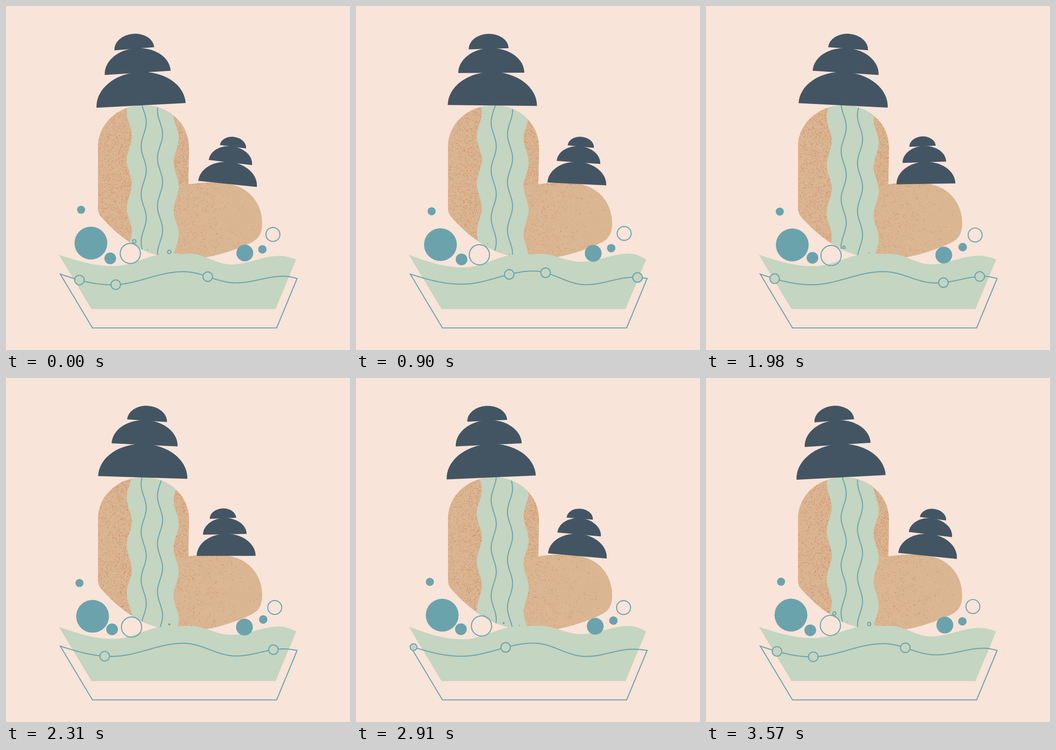
Write an HTML page with a canvas that moves like this. It is 748 px wide and 748 px high and loops after 3600 ms.

```html
<!DOCTYPE html>
<html lang="en">
<head>
<meta charset="utf-8">
<title>Stones and waterfall</title>
<style>
html, body { margin: 0; width: 100%; height: 100%; overflow: hidden; background: #f8e4d9; }
canvas { display: block; }
</style>
</head>
<body>
<canvas id="stage" width="748" height="748"></canvas>
<script>
const ctx = document.getElementById('stage').getContext('2d');
const LOOP = 3600, SWAY = 1680, TAU = Math.PI * 2, RAD = Math.PI / 180;
const BG = '#f8e4d9', DARK = '#435563', TEAL = '#6ba3ad', MINT = '#c4d5c1', TAN = '#dab692', RUST = '#c4653f';

const clamp = v => Math.max(0, Math.min(1, v));
const mix = (a, b, p) => a + (b - a) * p;
const ease = v => { const p = clamp(v); return p < .5 ? 4 * p ** 3 : 1 - 4 * (1 - p) ** 3; };

const rock = new Path2D('M200 307C200 256 243 216 299 216S398 256 398 307L396.500 388' +
  'C425 383.500 462 382 490 388C532 397 557 432 557 472C557 494 550 506 534 514' +
  'C505 528 470 540 437 546L420 551H345L335 543C290 533 248 504 208 460Q200 451 200 441Z');

// x, y, radius, phase in degrees; a negative phase orbits clockwise
const solids = [
  [185.8, 517.7, 35.7, 28], [229.2, 548.5, 12.7, 95], [162.2, 445.2, 8.8, -27],
  [517.8, 539.2, 18.3, 324], [557.4, 526.6, 9.2, -180]
];
const rings = [[270.8, 540.5, 22, 10], [582.9, 497, 15.2, -274]];

// x, y, time of birth
const splashes = [
  [286, 517, 840], [334, 540, 880], [300, 527, 1440], [355, 537, 1930],
  [321, 534, 2560], [355, 538, 2890], [279, 515, 2900], [308, 530, 3540]
];
const beadBirths = [1775, 2890, 3330];

// turning points: x, y, swing
const water = [[115, 541, 0], [233, 567, -1.5], [356, 539, -.7], [400, 539, 0], [489, 559, 3], [594, 541, 2.5], [631, 551, 0]];
const rim = [[118, 583, 0], [229, 605.5, .7], [386, 577, .7], [500, 604, -2], [604, 588.8, -1.2], [633, 592.5, 0]];

const swing = (points, t) => points.map(([x, y, dy]) => [x, y + dy * Math.cos(2 * TAU * t / LOOP)]);

function waveY(points, x) {
  const last = points.length - 2;
  let i = 0;
  while (i < last && x > points[i + 1][0]) i++;
  const [x0, y0] = points[i], [x1, y1] = points[i + 1];
  const a = clamp((x - x0) / (x1 - x0)) * Math.PI;
  const p = i === 0 ? Math.sin(a / 2) : i === last ? 1 - Math.cos(a / 2) : (1 - Math.cos(a)) / 2;
  return mix(y0, y1, p);
}

function bowl(points, left, right, bottom) {
  const end = points[points.length - 1];
  ctx.beginPath();
  for (let x = points[0][0]; x < end[0]; x += 2) ctx.lineTo(x, waveY(points, x));
  ctx.lineTo(...end);
  ctx.lineTo(right, bottom);
  ctx.lineTo(left, bottom);
  ctx.closePath();
}

function disc(x, y, r, fill, stroke) {
  ctx.beginPath();
  ctx.arc(x, y, r, 0, TAU);
  if (fill) { ctx.fillStyle = fill; ctx.fill(); }
  if (stroke) ctx.stroke();
}

function speckle(seed) {
  let s = seed * 7919 + 17;
  const rnd = () => (s = (s * 16807) % 2147483647) / 2147483647;
  rnd();
  ctx.fillStyle = RUST;
  for (let i = 0; i < 18000; i++) {
    const x = 200 + 358 * rnd(), y = 216 + 332 * rnd(), size = .6 + .8 * rnd() ** 2;
    const foot = x > 364 && y > 388;
    const density = foot ? .4 * (1 - (x - 364) / 200) ** 1.4 : .5 + .5 * clamp((x - 200) / 70);
    ctx.globalAlpha = .4 + .5 * rnd();
    if (rnd() < density) ctx.fillRect(x, y, size, size);
  }
  ctx.globalAlpha = 1;
}

function waterfall(t) {
  const edge = (mid, peak) => y => mid + 5.5 * Math.cos(TAU * ((y - peak) / 104 - 2 * t / LOOP));
  const left = edge(268, 283), right = edge(370, 288);
  ctx.beginPath();
  for (let y = 210; y <= 556; y += 2) ctx.lineTo(left(y), y);
  for (let y = 556; y >= 210; y -= 2) ctx.lineTo(right(y), y);
  ctx.fillStyle = MINT;
  ctx.fill();
  for (const line of [edge(299.4, 253), edge(334.9, 279)]) {
    ctx.beginPath();
    for (let y = 210; y <= 556; y += 2) ctx.lineTo(line(y), y);
    ctx.stroke();
  }
}

// Each stone rests on the one below and follows its sway a little later.
function stack(t, x, y, scale, tilt, amount, delay) {
  ctx.save();
  ctx.translate(x, y);
  ctx.rotate(tilt * RAD);
  ctx.scale(scale, scale);
  ctx.fillStyle = DARK;
  let base = 0;
  [97, 71.8, 43.4].forEach((rx, i) => {
    const time = t - delay - 90 * i;
    const sway = amount * (2 * (ease(time / SWAY) - ease(time / SWAY - 1)) - 1);
    ctx.beginPath();
    ctx.ellipse((2.3 + 6.35 * i) * sway - i, base, rx, rx * .75, (3 + .75 * i) * sway * RAD, Math.PI, TAU);
    ctx.fill();
    base -= rx * .73;
  });
  ctx.restore();
}

function bead(t, birth, points) {
  const age = (t - birth + LOOP) % LOOP;
  const x = 117 + .1795 * age + 6 * Math.sin(2 * TAU * (t - 450) / LOOP);
  const scale = Math.min(1, (x - 117) / 11.5, (634 - x) / 17);
  if (scale > 0) disc(x, waveY(points, x), 10.4 * scale, MINT, true);
}

function bubble(t, [x, y, r, phase], outlined) {
  const a = Math.sign(phase) * TAU * t / LOOP + phase * RAD;
  disc(x - 2.5 * Math.sin(a), y - 2.5 * Math.cos(a), r, !outlined && TEAL, outlined);
}

function splash(t, [x, y, birth]) {
  const p = (t - birth + LOOP) % LOOP / 740;
  if (p > 1) return;
  const r = mix(1, 4.5, p ** 1.5), outlined = r > 2.5;
  disc(x, y + 1 - r, outlined ? r - .5 : r, !outlined && TEAL, outlined);
}

function draw(now) {
  const t = now % LOOP;
  ctx.fillStyle = BG;
  ctx.fillRect(0, 0, 748, 748);
  ctx.strokeStyle = TEAL;
  ctx.lineWidth = 2.2;

  ctx.save();
  ctx.fillStyle = TAN;
  ctx.fill(rock);
  ctx.clip(rock);
  speckle(1 + Math.floor(t / 300));
  waterfall(t);
  ctx.restore();

  stack(t, 296, 216.2, 1, 0, 1, 0);
  stack(t, 480, 386.8, .66, 2.5, -1.15, 90);

  bowl(swing(water, t), 186, 586, 659);
  ctx.fillStyle = MINT;
  ctx.fill();
  const rimPoints = swing(rim, t);
  bowl(rimPoints, 188, 588.5, 700);
  ctx.stroke();
  beadBirths.forEach(birth => bead(t, birth, rimPoints));

  solids.forEach(b => bubble(t, b, false));
  rings.forEach(b => bubble(t, b, true));
  splashes.forEach(s => splash(t, s));
  requestAnimationFrame(draw);
}
requestAnimationFrame(draw);
</script>
</body>
</html>
```
